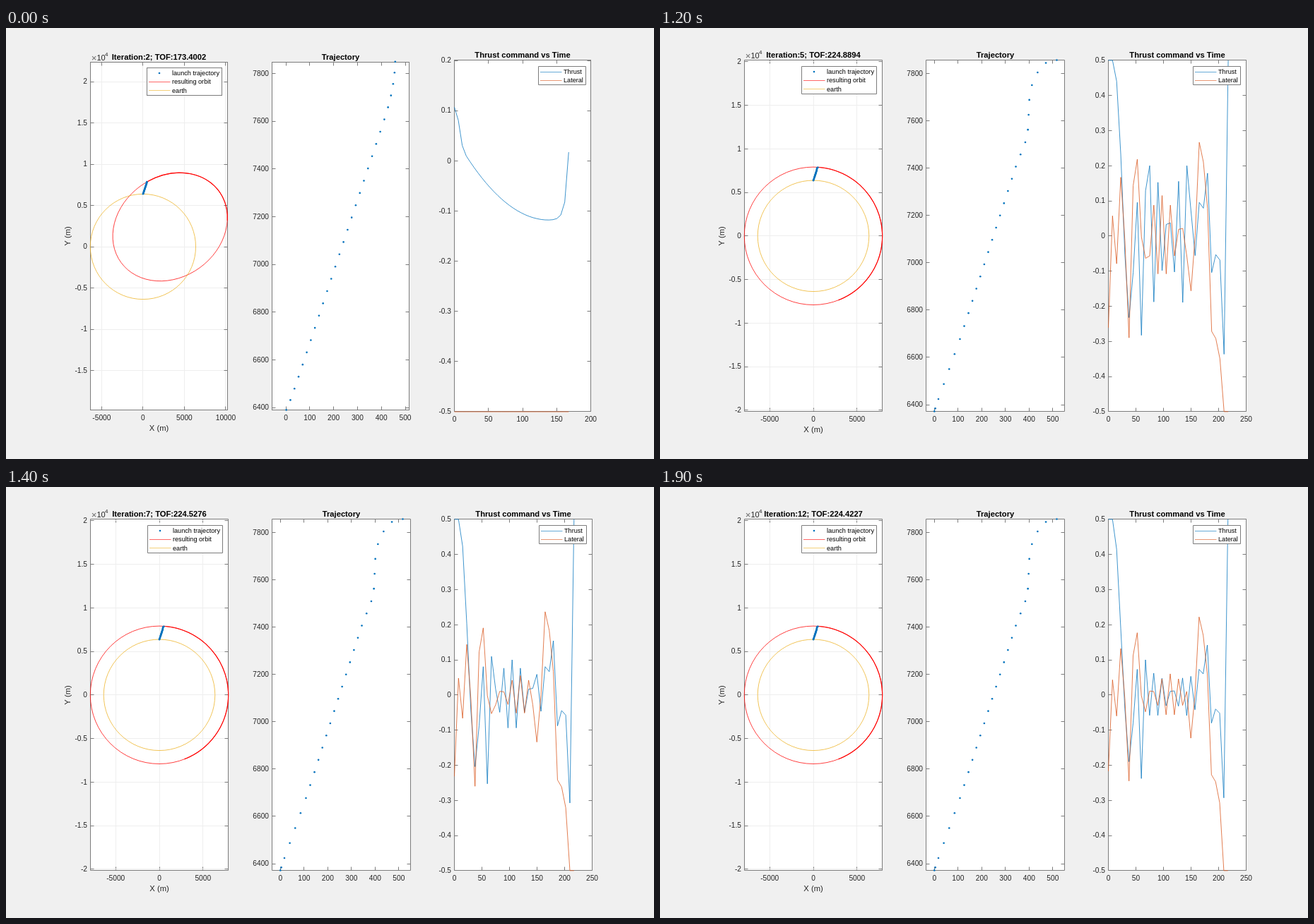
Animation, 917 px wide and 611 px high, one loop 3900 ms. Source, as an HTML page with a canvas:

```html
<!DOCTYPE html>
<html lang="en">
<head>
<meta charset="utf-8">
<title>Launch optimisation</title>
<style>
html, body { margin: 0; width: 100%; height: 100%; overflow: hidden; background: #f0f0f0; }
canvas { display: block; }
</style>
</head>
<body>
<canvas id="stage" width="917" height="611"></canvas>
<script>
const ctx = document.getElementById('stage').getContext('2d');
const BLUE = '#0072bd', ORANGE = '#d95319', RED = '#ff0000', YELLOW = '#edb120';
const INK = '#262626', FRAME = '#7c7c7c', GRID = '#eeeeee';
const EARTH = 6378, SAMPLES = 30, LIMIT = 500;

const sample = rule => Array.from({ length: SAMPLES }, (_, i) => rule(i));

// Linear interpolation between key points [index, ...values].
function between(keys, i) {
  const next = Math.max(1, keys.findIndex(key => key[0] >= i));
  const [from, to] = [keys[next - 1], keys[next]];
  const part = (i - from[0]) / (to[0] - from[0]);
  return from.slice(1).map((v, k) => v + (to[k + 1] - v) * part);
}

// An oscillation close to the sampling rate, so that it beats around its centre.
const beat = ([size, centre], i) => size * Math.cos(2.79 * (i - centre));

// Controls are in thousandths, one value per thirtieth of the time of flight.
const firstThrust = sample(i => -118 + 0.29 * (24 - i) ** 2
  + 58 * Math.exp(-((i / 1.6) ** 3)) + 128 * Math.exp(1.42 * (i - 29)));

const saturated = (keys, level, wave) =>
  sample(i => i > 12 && i < 18 ? level + beat(wave, i) : between(keys, i)[0]);
const wildThrust = saturated([[0, -LIMIT], [1, LIMIT], [2, 400], [3, -LIMIT], [9, -LIMIT],
  [10, 122], [11, -LIMIT], [12, -330], [18, -230], [19, -LIMIT], [20, -58], [22, -LIMIT],
  [25, -LIMIT], [26, 178], [28, -LIMIT], [29, LIMIT]], -315, [75, 13]);
const wildLateral = saturated([[0, LIMIT], [3, LIMIT], [5, -LIMIT], [6, 350], [7, 440],
  [8, -187], [9, 313], [10, -20], [11, 258], [12, 128], [18, 93], [19, LIMIT], [20, -330],
  [21, 370], [22, LIMIT], [24, LIMIT], [26, -LIMIT], [29, -LIMIT]], 165, [50, 16]);

// Later runs share a start and an end that calm down with each iteration.
const thrustEnds = [[500, 500, 415, 190, -40, -190, -80, 73, -238, 100],
  [53, -42, 73, 60, 142, -80, -40, -52, -293, 500]];
const lateralEnds = [[-217, 43, -60, 132, -10, -245, 112, 177, -2, -48],
  [-123, 0, 222, 170, 60, -227, -247, -307, -500, -500]];
const settling = ([head, tail], wave, iteration) => sample(i => {
  if (i >= 10 && i < 20) return beat(wave, i);
  const v = i < 10 ? head[i] : tail[i - 20];
  return v * (1 + 0.12 * (8 - iteration) * (1 - Math.abs(v) / LIMIT));
});

const runs = {
  2: { tof: '173.4002', thrust: firstThrust, lateral: sample(() => -LIMIT) },
  3: { tof: '211.1347', thrust: wildThrust, lateral: wildLateral },
};
const addRun = (iteration, tof, thrustWave, lateralWave) => {
  runs[iteration] = {
    tof,
    thrust: settling(thrustEnds, thrustWave, iteration),
    lateral: settling(lateralEnds, lateralWave, iteration),
  };
};
addRun(4, '225.8888', [100, 18], [80, 16]);
addRun(5, '224.8894', [200, 10], [115, 13]);
addRun(6, '224.7191', [155, 17], [50, 18]);
addRun(7, '224.5276', [100, 14], [55, 16]);
addRun(8, '224.4227', [62, 11], [60, 15]);

// Launch trajectories in metres.
const firstPath = sample(i => {
  const bend = Math.max(0, i - 24) ** 2;
  return [2 + 17.1 * i - 1.6 * bend, 6374 + 51.4 * i + 16 * Math.exp(-i) - 0.6 * bend];
});
const pathKeys = [[0, 0, 6372], [1, 4, 6384], [2, 17, 6424], [6, 108, 6677], [8, 144, 6787],
  [20, 344, 7406], [22, 384, 7509], [23, 395, 7562], [25, 401, 7688], [26, 412, 7750],
  [27, 436, 7804], [28, 471, 7844], [29, 517, 7856]];
const finalPath = sample(i => between(pathKeys, i));
const thirdPath = finalPath.map(([x, y], i) => [x + (i > 27 ? 8 : 0), y]);

// box: left, top, right, bottom; x, y: pixel of a reference value, that value, pixels per unit.
const axes = (box, x, y, xTicks, yTicks) => ({
  box, xTicks, yTicks,
  px: v => x[0] + (v - x[1]) * x[2],
  py: v => y[0] - (v - y[1]) * y[2],
});
const range = (from, to, step) =>
  Array.from({ length: Math.round((to - from) / step) + 1 }, (_, i) => +(from + i * step).toFixed(6));

const controlAxes = axes([634.5, 45.5, 829.5, 543.5], [634.5, 0, 0.78], [294.8, 0, 498],
  range(0, 250, 50), range(-0.5, 0.5, 0.1));
const firstView = {
  path: firstPath, labelX: 88, legend: [199.5, 56.5], controlLegend: 753.5,
  orbit: { cx: 232.2, cy: 282, a: 85.8, b: 71.5, tilt: -0.628, from: -1.44, to: 0.6 },
  orbitAxes: axes([119.5, 48.5, 313.5, 541.5], [193.9, 0, 0.0117], [310, 0, 0.0117],
    range(-5000, 10000, 5000), range(-15000, 20000, 5000)),
  pathAxes: axes([376.5, 48.5, 570.5, 541.5], [396, 0, 0.338], [538, 6400, 0.3382],
    range(0, 500, 100), range(6400, 7800, 200)),
  controlAxes: axes([634.5, 45.5, 827.5, 543.5], [634.5, 0, 0.965], [188.3, 0, 711.4],
    range(0, 200, 50), range(-0.5, 0.2, 0.1)),
};
const laterView = (path, left, right, labelX, legendX, pathBox, pathX, radius, arcEnd, scale) => ({
  path, labelX, legend: [legendX, 54.5], controlLegend: 754.5, controlAxes,
  orbit: { cx: 217, cy: 294.8, a: radius, b: radius, tilt: 0, from: -1.51, to: arcEnd },
  orbitAxes: axes([left, 45.5, right, 543.5],
    [217, 0, scale], [294.8, 0, scale], [-5000, 0, 5000], range(-20000, 20000, 5000)),
  pathAxes: axes([pathBox[0], 45.5, pathBox[1], 543.5], [pathX, 0, 0.335], [534, 6400, 0.3355],
    range(0, 500, 100), range(6400, 7800, 200)),
});
const thirdView = laterView(thirdPath, 120.5, 313.5, 89, 199.5, [377.5, 571.5], 387, 97, 1.265, 0.01232);
const finalView = laterView(finalPath, 119.5, 314.5, 88, 200.5, [376.5, 572.5], 388.3, 97.7, 1.2, 0.01235);

function text(str, x, y, size = 10.2, align = 'center', weight = '', color = INK) {
  ctx.font = `${weight} ${size}px "Liberation Sans", Arial, sans-serif`;
  ctx.textAlign = align;
  ctx.textBaseline = 'middle';
  ctx.fillStyle = color;
  ctx.fillText(str, x, y);
}

function line(points, color, width = 1) {
  ctx.beginPath();
  points.forEach(([x, y]) => ctx.lineTo(x, y));
  ctx.strokeStyle = color;
  ctx.lineWidth = width;
  ctx.stroke();
}

function dot(x, y, r) {
  ctx.beginPath();
  ctx.arc(x, y, r, 0, 7);
  ctx.fillStyle = BLUE;
  ctx.fill();
}

function ellipse({ cx, cy, a, b, tilt }, color, width, from = 0, to = Math.PI * 2) {
  ctx.beginPath();
  ctx.ellipse(cx, cy, a, b, tilt, from, to);
  ctx.strokeStyle = color;
  ctx.lineWidth = width;
  ctx.stroke();
}

function frame(x, y, width, height) {
  ctx.fillStyle = '#fff';
  ctx.fillRect(x, y, width, height);
  ctx.strokeStyle = FRAME;
  ctx.lineWidth = 1;
  ctx.strokeRect(x, y, width, height);
}

function panel({ box: [l, t, r, b], xTicks, yTicks, px, py }, title, grid, yUnit = 1) {
  const snap = v => Math.floor(v) + 0.5;
  frame(l, t, r - l, b - t);
  xTicks.forEach(v => {
    const x = Math.min(snap(px(v)), r);
    if (grid) line([[x, t + 0.5], [x, b - 0.5]], GRID);
    line([[x, b], [x, b - 5]], FRAME);
    line([[x, t], [x, t + 5]], FRAME);
    text(v, px(v), b + 11.5);
  });
  yTicks.forEach(v => {
    const y = Math.max(t, Math.min(snap(py(v)), b));
    if (grid) line([[l + 0.5, y], [r - 0.5, y]], GRID);
    line([[l, y], [l + 5, y]], FRAME);
    line([[r, y], [r - 5, y]], FRAME);
    text(v / yUnit, l - 4.5, py(v) + 0.5, 10.2, 'right');
  });
  text(title, (l + r) / 2, t - 7, 11.2, 'center', 'bold', '#000');
}

function legend(x, y, width, height, entries) {
  frame(x, y, width, height);
  entries.forEach(([label, color], i) => {
    const row = y + 7.5 + i * 12.3;
    const lineY = Math.floor(row) + 0.5;
    if (color) line([[x + 2.5, lineY], [x + 33, lineY]], color, 0.6);
    else dot(x + 17.5, row, 1.3);
    text(label, x + 35.5, row + 0.5, 9.15, 'left', '', '#000');
  });
}

function draw(iteration) {
  const run = runs[Math.min(iteration, 8)];
  const view = iteration === 2 ? firstView : iteration === 3 ? thirdView : finalView;
  const { orbitAxes: oa, pathAxes: pa, controlAxes: ca, orbit } = view;
  ctx.fillStyle = '#f0f0f0';
  ctx.fillRect(0, 0, 917, 611);

  // Orbit
  const [l, t, r, b] = oa.box;
  panel(oa, `Iteration:${iteration}; TOF:${run.tof}`, true, 10000);
  text('×', l + 5, t - 5.5, 13, 'center', '', '#666');
  text('10', l + 9, t - 5.5, 11, 'left');
  text('4', l + 20.5, t - 10.5, 8, 'left');
  text('X (m)', (l + r) / 2, b + 26, 11.2);
  ctx.save();
  ctx.translate(view.labelX, 295);
  ctx.rotate(-Math.PI / 2);
  text('Y (m)', 0, 0, 11.2);
  ctx.restore();
  const earthRadius = oa.px(EARTH) - oa.px(0);
  ellipse(orbit, RED, 0.75);
  ellipse(orbit, RED, 1.1, orbit.from, orbit.to);
  ellipse({ cx: oa.px(0), cy: oa.py(0), a: earthRadius, b: earthRadius, tilt: 0 }, YELLOW, 0.75);
  view.path.forEach(([x, y]) => dot(oa.px(x), oa.py(y), 1.3));
  legend(...view.legend, 106, 39, [['launch trajectory'], ['resulting orbit', RED], ['earth', YELLOW]]);

  // Trajectory
  panel(pa, 'Trajectory');
  view.path.forEach(([x, y]) => dot(pa.px(x), pa.py(y), 1.3));

  // Controls
  panel(ca, 'Thrust command vs Time');
  const curve = values => values.map((v, i) => [ca.px(i * run.tof / SAMPLES), ca.py(v / 1000)]);
  ctx.lineJoin = 'bevel';
  line(curve(run.thrust), BLUE, 0.75);
  line(curve(run.lateral), ORANGE, 0.75);
  legend(view.controlLegend, 54.5, 67, 26, [['Thrust', BLUE], ['Lateral', ORANGE]]);
}

let shown = 0;
function tick(now) {
  const t = now % 3900;
  const iteration = t < 1000 ? 2 : Math.min(12, 3 + Math.floor((t - 1000) / 100));
  if (iteration !== shown) draw(shown = iteration);
  requestAnimationFrame(tick);
}
tick(performance.now());
</script>
</body>
</html>
```
